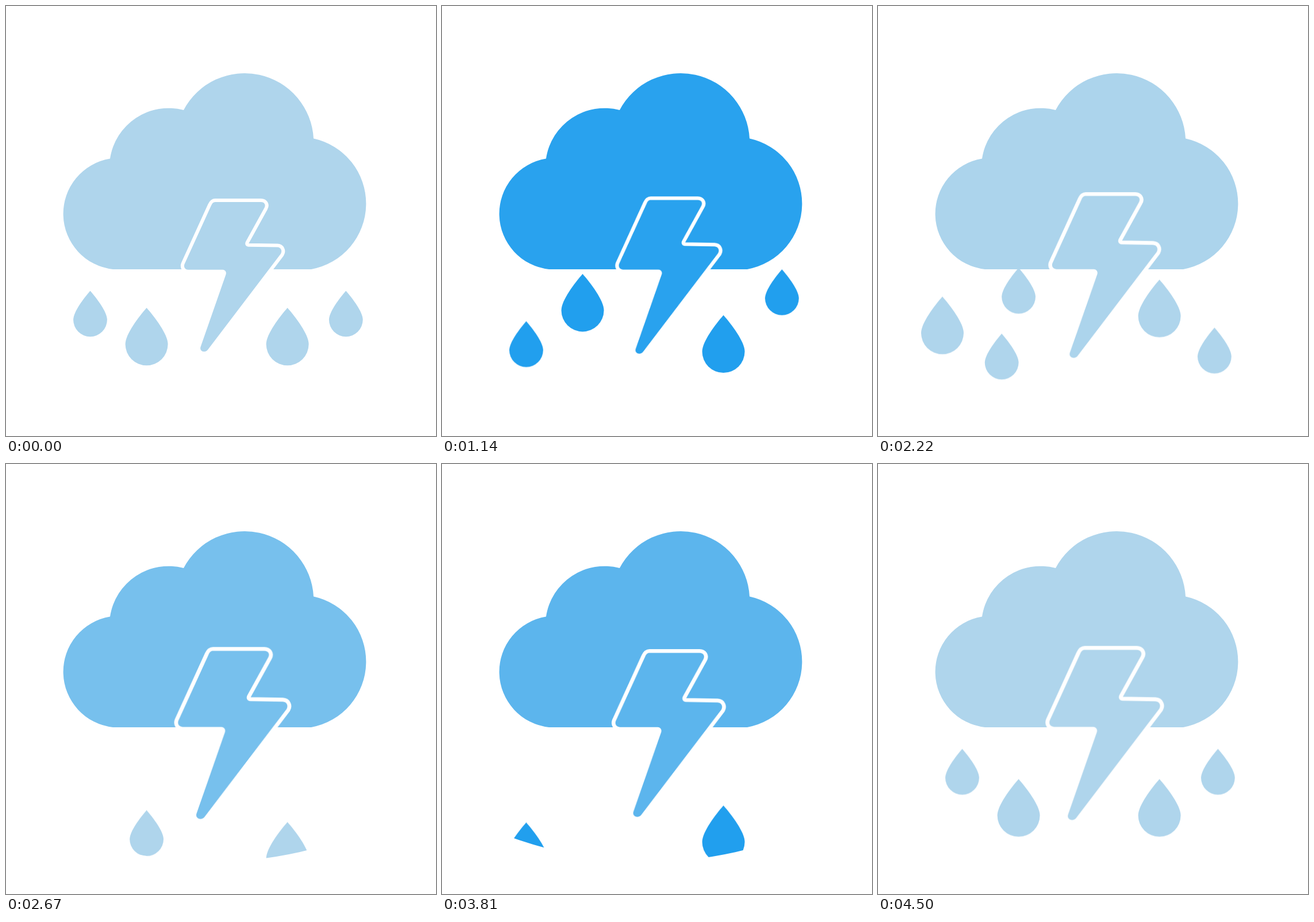
An HTML page that plays this animation: 748x748 px, repeating every 4530 ms.

```html
<!DOCTYPE html>
<html lang="en">
<head>
<meta charset="utf-8">
<title>Thunderstorm</title>
<style>
  :root { --light: #afd5ec; --blue: #219fee; --loop: 4530ms; }
  html, body { margin: 0; width: 100%; height: 100%; overflow: hidden; background: #fff; }
  svg { display: block; width: 100%; height: 100%; }

  .sky { animation: tint var(--loop) linear -2ms infinite; }
  .bolt {
    stroke: #fff; stroke-width: 12; stroke-linejoin: round; paint-order: stroke;
    transform-origin: 396px 470px;
    animation: pulse var(--loop) steps(10) -2ms infinite;
  }
  .rain { animation: fall var(--loop) steps(151) -2ms infinite; }
  .light { fill: var(--light); }
  .blue { fill: var(--blue); }

  @keyframes tint {
    0%, 49.669%, 99.338%, 100% { fill: var(--light); }
    23.841%, 73.51% { fill: var(--blue); }
  }
  @keyframes pulse {
    0%, 13.245%, 26.49%, 39.735%, 52.98%, 66.225%, 79.47%, 92.715% { transform: scale(1); }
    6.6225%, 19.8675%, 33.1126%, 46.3576%, 59.6026%, 72.8477%, 86.0927%, 99.3377%, 100% { transform: scale(1.137); }
  }
  @keyframes fall {
    from { transform: translateY(0); }
    to { transform: translateY(1478.3px); }
  }
</style>
</head>
<body>
<svg viewBox="0 0 748 748">
  <defs>
    <path id="big" d="M0 0C14 16 37 46 37 63.3A37 37 0 0 1 -37 63.3C-37 46 -14 16 0 0Z"/>
    <path id="small" transform="scale(.795)" d="M0 0C14 16 37 46 37 63.3A37 37 0 0 1 -37 63.3C-37 46 -14 16 0 0Z"/>
    <clipPath id="below"><path d="M0 456.5H748V580.6Q374 795.4 0 596.1Z"/></clipPath>
  </defs>

  <g class="sky">
    <path d="M186 458A97.2 97.2 0 0 1 181 265.5A103 103 0 0 1 309 181A120 120 0 0 1 535 230.5A116 116 0 0 1 531 458Z"/>
    <path class="bolt" d="M364 341H443.5C449.5 341 452.5 346 449.5 351L417.5 409C414.5 414 417 418.6 422 418.7L472 419.6C478.5 419.8 481 426 478 431L351 598C346 604.5 336 600.5 338.5 593L382.5 467C384 462.5 381 458.7 377 458.7H317C311.5 458.7 308.5 454 310.5 449L357 347C358.8 343 360.5 341 364 341Z"/>
  </g>

  <!-- One tall sheet of drops slides past the gap below the cloud. -->
  <g clip-path="url(#below)">
    <g class="rain">
      <g class="light">
        <use href="#small" x="146.5" y="495.5"/>
        <use href="#big" x="244.6" y="525"/>
        <use href="#big" x="489.6" y="525"/>
        <use href="#small" x="591.3" y="495.5"/>
      </g>
      <g class="blue">
        <use href="#small" x="146.5" y="176.3"/>
        <use href="#big" x="489.6" y="165.8"/>
        <use href="#big" x="244.6" y="94.1"/>
        <use href="#small" x="591.3" y="86.1"/>
      </g>
      <g class="light">
        <use href="#big" x="112" y="-219"/>
        <use href="#small" x="244.6" y="-269"/>
        <use href="#small" x="215.2" y="-154.5"/>
        <use href="#big" x="489.6" y="-248.5"/>
        <use href="#small" x="585.3" y="-165"/>
      </g>
      <g class="blue">
        <use href="#big" x="146.5" y="-619.7"/>
        <use href="#small" x="250.2" y="-554.7"/>
        <use href="#big" x="489.6" y="-649.2"/>
        <use href="#small" x="591.3" y="-575.7"/>
      </g>
      <g class="light">
        <use href="#small" x="146.5" y="-973"/>
        <use href="#big" x="244.6" y="-920.5"/>
        <use href="#big" x="489.6" y="-920.5"/>
        <use href="#small" x="591.3" y="-973"/>
      </g>
    </g>
  </g>
</svg>
</body>
</html>
```
